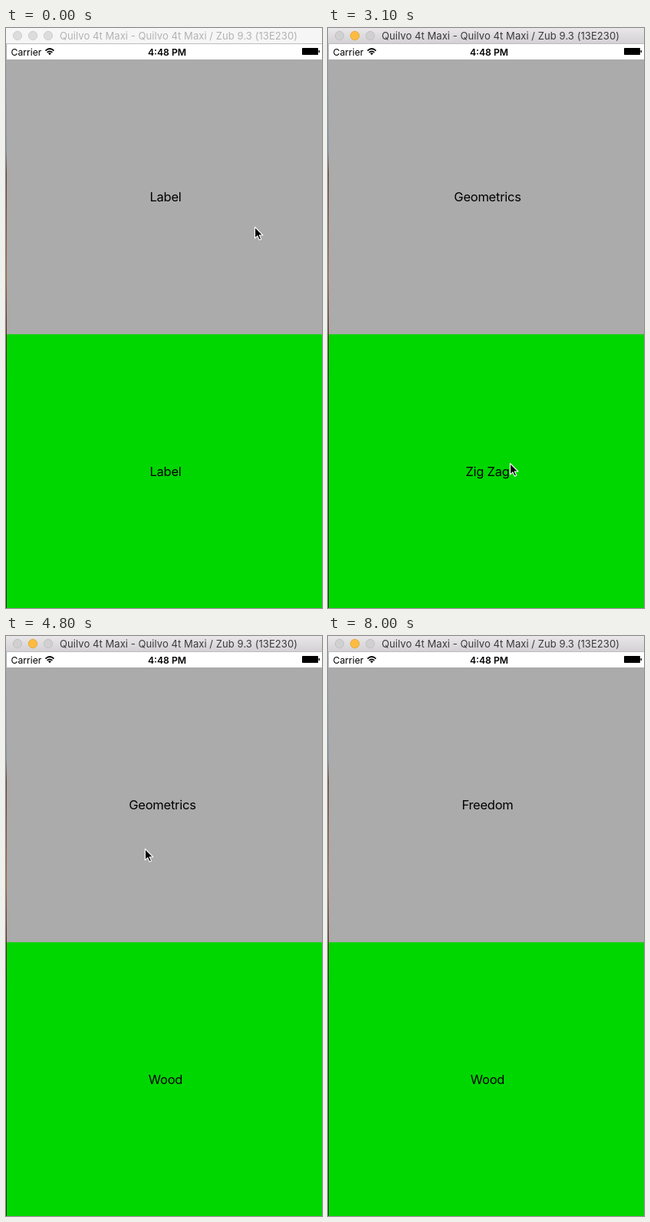
An HTML page that plays this animation: 412 px wide and 756 px high, repeating every 8.1 s.

```html
<!DOCTYPE html>
<html lang="en">
<head>
<meta charset="utf-8">
<title>Swipe labels</title>
<style>
  html, body { margin: 0; width: 100%; height: 100%; overflow: hidden; background: #fff; }
  svg { display: block; width: 412px; height: 756px; font-family: Inter, Roboto, sans-serif; }
  .label { font-size: 16.5px; letter-spacing: -.25px; text-anchor: middle; }
  .title { font-size: 13px; letter-spacing: .07px; fill: #b2b2b2; }
  .status { font-size: 12.2px; }
  .dot { fill: #dcdcdc; stroke: #c9c9c9; stroke-width: .8; }
  .bar { fill: #f6f6f6; }
  .active .title { fill: #3a3a3a; }
  .active .bar { fill: url(#barFill); }
  .active .dot { fill: #d0d0d0; stroke: #bcbcbc; }
  .active .minimise { fill: #fdbc40; stroke: #e2a02f; }
</style>
</head>
<body>
<svg viewBox="0 0 412 756">
  <defs>
    <linearGradient id="barFill" x2="0" y2="1">
      <stop stop-color="#e9e7e9"/>
      <stop offset="1" stop-color="#d2d0d2"/>
    </linearGradient>
    <linearGradient id="desktop" x2="0" y2="1">
      <stop stop-color="#a9b0bd"/>
      <stop offset=".19" stop-color="#8592ab"/>
      <stop offset=".23" stop-color="#6b3b29"/>
      <stop offset=".41" stop-color="#a5673e"/>
      <stop offset=".52" stop-color="#5a2418"/>
      <stop offset=".6" stop-color="#1e3018"/>
    </linearGradient>
  </defs>

  <rect y="41" width="412" height="359" fill="#ababab"/>
  <rect y="399.2" width="412" height="357" fill="#00d700"/>

  <g id="top" class="label"><text y="226"/><text y="226"/></g>
  <g id="bottom" class="label"><text y="584"/><text y="584"/></g>

  <g id="window">
    <rect class="bar" width="412" height="21"/>
    <rect y="20" width="412" height="1" fill="#bdbbbd"/>
    <circle class="dot" cx="15" cy="10" r="5.7"/>
    <circle class="dot minimise" cx="35" cy="10" r="5.7"/>
    <circle class="dot" cx="55" cy="10" r="5.7"/>
    <text class="title" x="70" y="15">Quilvo 4t Maxi - Quilvo 4t Maxi / Zub 9.3 (13E230)</text>
  </g>

  <rect y="21" width="412" height="20" fill="#fff"/>
  <g class="status">
    <text x="6.5" y="35.5">Carrier</text>
    <text x="210" y="35.5" text-anchor="middle" font-weight="600">4:48 PM</text>
  </g>
  <g fill="none" stroke="#000" stroke-width="1.7">
    <path d="M51.5 29.6Q57 24.4 62.5 29.6M53.6 31.9Q57 28.8 60.4 31.9"/>
    <path d="M55 33Q57 31.3 59 33L57 35.3Z" fill="#000" stroke="none"/>
  </g>
  <rect x="386" y="26" width="21" height="9" rx=".8"/>
  <rect x="407.6" y="29" width="1.4" height="3" rx=".6"/>

  <rect y="21" width="1" height="735" fill="url(#desktop)"/>
  <path id="cursor" d="M0 0V14.6L3.4 11.4 5.8 16.8 8.2 15.7 5.8 10.5H10.4Z"
        stroke="#fff" stroke-width="1.1" stroke-linejoin="round"/>
</svg>
<script>
  const LOOP = 8100, STEP = 100, WIDTH = 412, CENTER = 208;
  const PUSH = 300, GLIDE = 600;            // label slide, pointer's vertical move
  const REST_X = 324, REACH = 144;          // pointer's resting place and swipe length
  const SWIPE_LAG = 39, SWIPE_HALF = 367;   // swipe peaks just after the push begins

  const swipes = [
    { at: 1330, lane: 'top', text: 'Geometrics', y: 259 },
    { at: 2136, lane: 'bottom', text: 'Zig Zag', y: 567 },
    { at: 3220, lane: 'bottom', text: 'Philosophers', y: 567 },
    { at: 3880, lane: 'bottom', text: 'Wood', y: 588 },
    { at: 4779, lane: 'top', text: 'Solar Systems', y: 277 },
    { at: 5702, lane: 'top', text: 'Solar Systems', y: 268 },
    { at: 6700, lane: 'top', text: 'Geometrics', y: 268 },
    { at: 7602, lane: 'top', text: 'Freedom', y: 268 }
  ];
  const last = swipes[swipes.length - 1];

  const byId = id => document.getElementById(id);
  const clamp = v => Math.max(0, Math.min(1, v));
  const ease = v => {
    const t = clamp(v);
    return t < .5 ? 2 * t * t : 1 - 2 * (1 - t) ** 2;
  };

  function place(node, text, x) {
    node.textContent = text;
    node.setAttribute('x', x);
  }

  function drawLane(lane, time) {
    const [leaving, entering] = byId(lane).children;
    const done = swipes.filter(s => s.lane === lane && s.at <= time);
    const texts = ['', 'Label', ...done.map(s => s.text)];
    const p = done.length ? ease((time - done[done.length - 1].at) / PUSH) : 1;
    place(leaving, texts[texts.length - 2], CENTER - WIDTH * p);
    place(entering, texts[texts.length - 1], CENTER + WIDTH * (1 - p));
  }

  function drawCursor(time) {
    let x = REST_X, y = swipes[0].y;
    for (const s of swipes) {
      const d = clamp(Math.abs(time - s.at - SWIPE_LAG) / SWIPE_HALF);
      x -= REACH * (1 + Math.cos(Math.PI * d)) / 2;
      y += (s.y - y) * ease((time - s.at + GLIDE + 20) / GLIDE);
    }
    x -= WIDTH * ease((time - last.at) / 380);   // leaves the stage after the last swipe
    byId('cursor').setAttribute('transform', `translate(${x + .5} ${y + .5})`);
  }

  const begin = performance.now();
  function draw() {
    const elapsed = (performance.now() - begin) % LOOP;
    const time = Math.floor(elapsed / STEP) * STEP;
    byId('window').classList.toggle('active', time >= 1100);
    drawLane('top', time);
    drawLane('bottom', time);
    drawCursor(time);
    requestAnimationFrame(draw);
  }
  draw();
</script>
</body>
</html>
```
